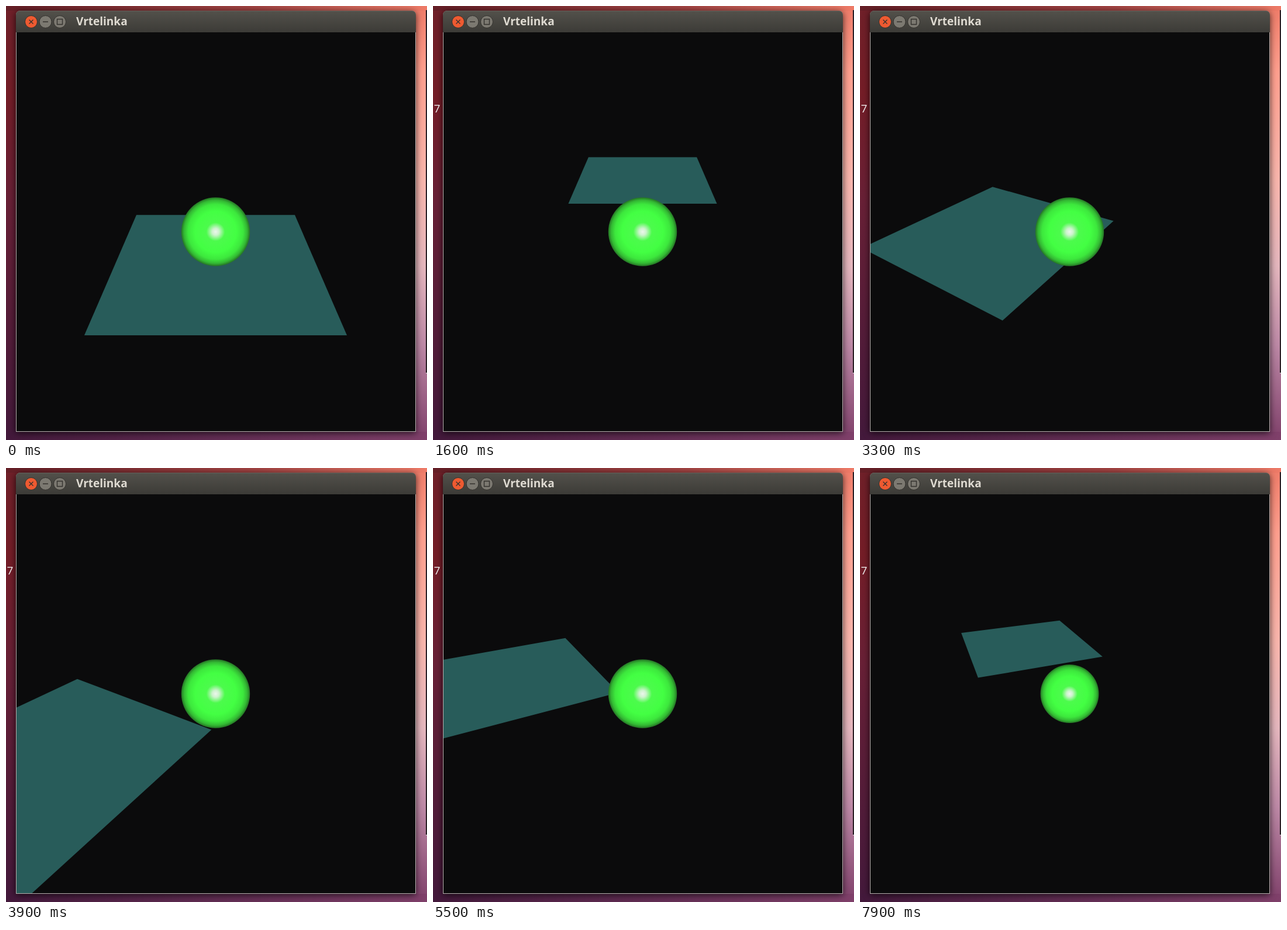
Write an HTML page that moves like this. It is 720 by 742 pixels and loops after 8000 ms.

```html
<!DOCTYPE html>
<html lang="en">
<head>
<meta charset="utf-8">
<title>Vrtelinka</title>
<style>
html, body { margin: 0; width: 100%; height: 100%; overflow: hidden; background: #0b0b0c; }
svg { display: block; }
text { font-family: "Open Sans", "Noto Sans", sans-serif; }
.shadow { filter: drop-shadow(0 2px 6px #000b); }
</style>
</head>
<body>
<svg width="720" height="742" viewBox="0 0 720 742">
  <defs>
    <linearGradient id="left" x2="0" y2="1">
      <stop offset="0" stop-color="#6f2029"/><stop offset=".2" stop-color="#741d27"/>
      <stop offset=".45" stop-color="#682036"/><stop offset="1" stop-color="#43193b"/>
    </linearGradient>
    <linearGradient id="right" x2="0" y2="1">
      <stop offset="0" stop-color="#ee7b68"/><stop offset=".15" stop-color="#ff9f8e"/>
      <stop offset=".4" stop-color="#f8b5ac"/><stop offset=".6" stop-color="#e4b6bd"/>
      <stop offset=".78" stop-color="#bd89a6"/><stop offset="1" stop-color="#7f406a"/>
    </linearGradient>
    <linearGradient id="top">
      <stop offset="0" stop-color="#641e26"/><stop offset=".6" stop-color="#a54544"/><stop offset="1" stop-color="#ee7b68"/>
    </linearGradient>
    <linearGradient id="bottom">
      <stop offset="0" stop-color="#43193b"/><stop offset="1" stop-color="#7f406a"/>
    </linearGradient>
    <linearGradient id="bar" x2="0" y2="1">
      <stop offset="0" stop-color="#53514b"/><stop offset="1" stop-color="#3c3b37"/>
    </linearGradient>
    <radialGradient id="green">
      <stop offset="0" stop-color="#ecf6ec"/><stop offset=".1" stop-color="#cdf3cd"/>
      <stop offset=".27" stop-color="#4cfb4c"/><stop offset=".6" stop-color="#43ff43"/>
      <stop offset=".8" stop-color="#3de83d"/><stop offset=".92" stop-color="#33b833"/>
      <stop offset="1" stop-color="#257425"/>
    </radialGradient>
    <clipPath id="view"><rect x="18" y="45" width="682" height="682"/></clipPath>
  </defs>

  <rect width="360" height="742" fill="url(#left)"/>
  <rect x="360" width="360" height="742" fill="url(#right)"/>
  <rect width="720" height="8" fill="url(#top)"/>
  <rect y="728" width="720" height="14" fill="url(#bottom)"/>
  <path d="M718 7h2v620h-2z" fill="#2b2026"/>
  <path d="M718 627.5h2" stroke="#ddd"/>

  <path class="shadow" d="M17 728V16q0-8 8-8h668q8 0 8 8v712z" fill="#b4aeac"/>
  <path d="M17 45V16q0-8 8-8h668q8 0 8 8v29z" fill="url(#bar)"/>
  <path d="M23 8.5h672" stroke="#64625c"/>
  <rect x="18" y="45" width="682" height="682" fill="#0b0b0c"/>

  <g stroke="#34322e">
    <circle cx="43" cy="27" r="10.5" fill="#ee5a31"/>
    <circle cx="67.5" cy="27" r="10.5" fill="#7c7971"/>
    <circle cx="92" cy="27" r="10.5" fill="#7c7971"/>
    <path d="M39.5 23.5l7 7m0-7l-7 7M63 27h9M87.5 22.5h9v9h-9z" fill="none" stroke-width="1.4"/>
  </g>
  <text x="120" y="33" font-size="19" font-weight="700" fill="#dfdbd2">Vrtelinka</text>
  <text id="digit" x="1.5" y="181.5" font-size="19" fill="#eee">7</text>

  <g clip-path="url(#view)">
    <polygon id="floor" fill="#285c5a"/>
    <circle id="ball" cx="358.5" cy="386" fill="url(#green)"/>
  </g>
</svg>
<script>
const [digit, floor, ball] = ["digit", "floor", "ball"].map(id => document.getElementById(id));
const FOCAL = 591.5, SIN = 0.5, COS = Math.sqrt(0.75);   // 60° lens, pitched down 30°

// Steady moves in ticks of 100 ms: ball x and y on the floor, camera yaw and distance
const moves = [
  { from: 9, to: 16, x: 7 },
  { from: 16.5, to: 26, yaw: 57.5 },
  { from: 27, to: 31, x: -4 },
  { from: 33.5, to: 43, y: -5.85 },
  { from: 38.5, to: 46, x: -1.5 },
  { from: 44, to: 48, yaw: -40 },
  { from: 48, to: 64, x: 8, y: 6.8, yaw: 25.3 },
  { from: 64, to: 66, x: 2, y: 1.5, yaw: -19 },
  { from: 66, to: 76, x: -4.13, y: -1.96, yaw: -1.9 },
  { from: 76, to: 79, dist: 1.75 }
];

function pose(tick) {
  const now = { x: 0, y: 0, yaw: 0, dist: 10 };
  for (const { from, to, ...change } of moves) {
    const part = Math.min(1, Math.max(0, (tick - from) / (to - from)));
    for (const name in change) now[name] += change[name] * part;
  }
  return now;
}

function draw(ms) {
  let tick = Math.floor(ms % 8000 / 100);
  if (tick % 5 === 2) tick--;   // every fifth tick repeats the one before
  const { x, y, yaw, dist } = pose(tick);
  const s = Math.sin(yaw * Math.PI / 180), c = Math.cos(yaw * Math.PI / 180);
  const height = dist * SIN + 1;

  const project = ([cx, cy]) => {
    const p = cx - x, q = cy - y;
    const side = p * s - q * c, ahead = dist * COS - p * c - q * s;
    const scale = FOCAL / (ahead * COS + height * SIN);
    return [358.5 + side * scale, 386 + (height * COS - ahead * SIN) * scale];
  };
  floor.setAttribute("points", [[-3, -3], [3, -3], [3, 3], [-3, 3]].map(project).join(" "));
  ball.setAttribute("r", 587 / dist);
  digit.setAttribute("visibility", tick < 13 ? "hidden" : "visible");
}

const start = performance.now();
function loop() {
  draw(performance.now() - start);
  requestAnimationFrame(loop);
}
loop();
</script>
</body>
</html>
```
